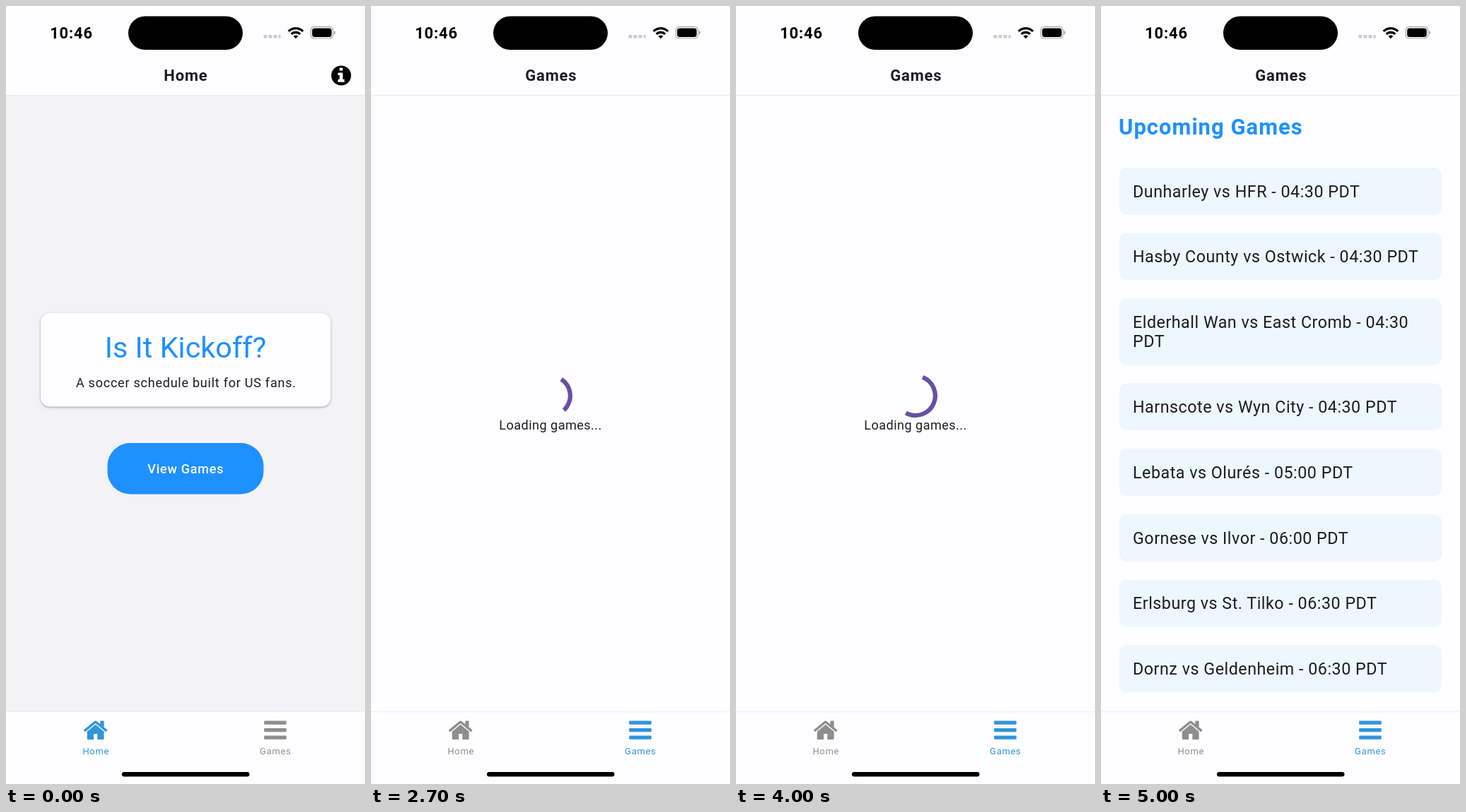
An HTML page that plays this animation: 508x1102 px, repeating every 5.1 s.

```html
<!DOCTYPE html>
<html lang="en">
<head>
<meta charset="utf-8">
<title>Game schedule</title>
<style>
  html, body { margin: 0; width: 100%; height: 100%; overflow: hidden; background: #fefdff; }
  svg { display: block; width: 100vw; height: 100vh; }
  text { font-family: Roboto, "Liberation Sans", sans-serif; fill: #1d1c20; }
  .mid { text-anchor: middle; }
  .head { font-size: 22px; font-weight: 600; letter-spacing: .8px; }
  .body { font-size: 18.1px; letter-spacing: .72px; }
  .wait { font-size: 18.1px; letter-spacing: .45px; }
  .title { font-size: 41.4px; fill: #1e90ff; }
  .label { font-size: 18.1px; font-weight: 500; letter-spacing: .7px; fill: #fefdff; }
  .section { font-size: 31px; font-weight: 700; letter-spacing: 1px; fill: #1e90ff; }
  .row { font-size: 23.3px; letter-spacing: .5px; }
  .tab { fill: #8e8e8f; }
  .tab text { font-size: 13px; letter-spacing: .7px; fill: inherit; }
  .card { filter: drop-shadow(0 1.3px 1.2px rgba(0, 0, 0, .28)) drop-shadow(0 1px 2.5px rgba(0, 0, 0, .1)); }
  .view { display: none; }
  [data-view=home] .home, [data-view=load] .load, [data-view=list] .list,
  [data-view=load] .games, [data-view=list] .games { display: inline; }
  [data-view=home] .tab-home, [data-view=load] .tab-games, [data-view=list] .tab-games { fill: #2f95dc; }
</style>
</head>
<body>
<svg id="app" data-view="home" viewBox="0 0 508 1102" preserveAspectRatio="none">
  <rect width="508" height="1102" fill="#fefdff"/>

  <g class="view home">
    <rect y="126" width="508" height="874" fill="#f3f2f5"/>
    <text class="mid head" x="254.4" y="106.3">Home</text>
    <g transform="translate(474.3 98.5)">
      <circle r="14"/>
      <path fill="#fefdff" d="M-2.3-11h4.6v4h-4.6zM-4.6-4.1h6.9v9.4h2.3v4h-9.2v-4h2.3v-5.9h-2.3z"/>
    </g>
    <rect class="card" x="49" y="435" width="410.5" height="132.5" rx="13" fill="#fefdff"/>
    <text class="mid title" x="254" y="497.6">Is It Kickoff?</text>
    <text class="mid body" x="254.8" y="540">A soccer schedule built for US fans.</text>
    <g id="button">
      <rect x="143.5" y="619" width="221" height="72.5" rx="32.3" fill="#1e90ff"/>
      <text class="mid label" x="254.3" y="662">View Games</text>
    </g>
  </g>

  <text class="view games mid head" x="254.8" y="106.3">Games</text>

  <g class="view load">
    <circle id="spinner" cx="254" cy="552" r="27.9" pathLength="360" fill="none" stroke="#6750a4" stroke-width="6.2"/>
    <text class="mid wait" x="254" y="600.3">Loading games...</text>
  </g>

  <g class="view list" id="list">
    <text class="section" x="25" y="182">Upcoming Games</text>
  </g>

  <!-- status bar -->
  <text class="mid head" x="92.5" y="46" style="fill:#000">10:46</text>
  <rect x="173" y="14.5" width="162" height="47.5" rx="23.75"/>
  <path d="M367 43.3h24" stroke="#cbcacd" stroke-width="4.6" stroke-dasharray="4.8 2.2" transform="translate(-2.4)"/>
  <g fill="none" stroke="#000" stroke-width="3.3">
    <path d="M399.8 35.8a14.4 14.4 0 0 1 20.4 0"/>
    <path d="M403.8 39.8a8.8 8.8 0 0 1 12.4 0"/>
  </g>
  <path d="M410 46.2l-3.4-3.4a4.8 4.8 0 0 1 6.8 0z"/>
  <rect x="431.2" y="29.4" width="31.6" height="16.6" rx="5" fill="none" stroke="#a5a4a7" stroke-width="1.2"/>
  <rect x="433.2" y="31.4" width="27.6" height="12.6" rx="3.4"/>
  <path d="M464.2 35q2 .6 2 2.7t-2 2.7z" fill="#a5a4a7"/>

  <!-- bar edges and tabs -->
  <path d="M0 126.5h508M0 999.8h508" stroke="#e8e7ea"/>
  <rect y="1000.3" width="508" height="101.7" fill="#fefdff"/>
  <g class="tab tab-home">
    <path transform="translate(108.15 1007.2) scale(.0207)" d="M1472 992v480q0 64-64 64h-384v-384h-256v384h-384q-64 0-64-64v-480l576-478zM1695 923l-62 74q-20 22-45 4L896 424 204 1001q-25 18-45-4l-62-74q-14-25 4-45l719-599q76-52 152 0l244 204v-195q0-32 32-32h192q32 0 32 32v408l219 182q18 20 4 45z"/>
    <text class="mid" x="127.3" y="1059.8">Home</text>
  </g>
  <g class="tab tab-games">
    <rect x="365.2" y="1012.5" width="31.6" height="5.3" rx="1.3"/>
    <rect x="365.2" y="1023" width="31.6" height="5.3" rx="1.3"/>
    <rect x="365.2" y="1033.5" width="31.6" height="5.3" rx="1.3"/>
    <text class="mid" x="381.3" y="1059.8">Games</text>
  </g>
  <rect x="164" y="1085" width="180.5" height="6.6" rx="3.3"/>
</svg>

<script>
const $ = id => document.getElementById(id);
const LOOP = 5100, HOLD = 100;
const PRESS = 2200, LOAD = 2300, LIST = 5000;
const SPIN = 2400, SPIN_START = 2266;

const games = [
  ["Dunharley vs HFR - 04:30 PDT"],
  ["Hasby County vs Ostwick - 04:30 PDT"],
  ["Elderhall Wan vs East Cromb - 04:30", "PDT"],
  ["Harnscote vs Wyn City - 04:30 PDT"],
  ["Lebata vs Olurés - 05:00 PDT"],
  ["Gornese vs Ilvor - 06:00 PDT"],
  ["Erlsburg vs St. Tilko - 06:30 PDT"],
  ["Dornz vs Geldenheim - 06:30 PDT"]
];

function add(tag, attrs, text = "") {
  const el = document.createElementNS($("app").namespaceURI, tag);
  for (const key in attrs) el.setAttribute(key, attrs[key]);
  el.textContent = text;
  $("list").append(el);
}

function buildList() {
  const line = 27.5;
  let y = 229;
  for (const lines of games) {
    const height = 66.5 + (lines.length - 1) * line;
    add("rect", { x: 26, y, width: 456, height, rx: 10, fill: "#eef6fe" });
    lines.forEach((text, i) => add("text", { class: "row", x: 45, y: y + 41.5 + i * line }, text));
    y += height + 26.2;
  }
}

// cubic-bezier(.4, 0, .7, 1)
function ease(x) {
  let lo = 0, hi = 1;
  for (let i = 0; i < 24; i++) {
    const u = (lo + hi) / 2, v = 1 - u;
    if (1.2 * u * v * v + 2.1 * u * u * v + u * u * u < x) lo = u; else hi = u;
  }
  return lo * lo * (3 - 2 * lo);
}

// The arc opens and closes once while turning twice.
function spin(time) {
  const p = ((time - SPIN_START) % SPIN) / SPIN;
  const half = 15 + 150 * ease(1 - Math.abs(1 - 2 * p));
  const start = 225 + 720 * p - half;
  $("spinner").setAttribute("stroke-dasharray", `${2 * half} 360`);
  $("spinner").setAttribute("transform", `rotate(${start} 254 552)`);
}

function draw(now) {
  const time = Math.floor((now % LOOP) / HOLD) * HOLD;
  $("app").dataset.view = time < LOAD ? "home" : time < LIST ? "load" : "list";
  $("button").setAttribute("opacity", time < PRESS ? 1 : 0.89);
  if (time >= LOAD) spin(time);
  requestAnimationFrame(draw);
}

buildList();
requestAnimationFrame(draw);
</script>
</body>
</html>
```
